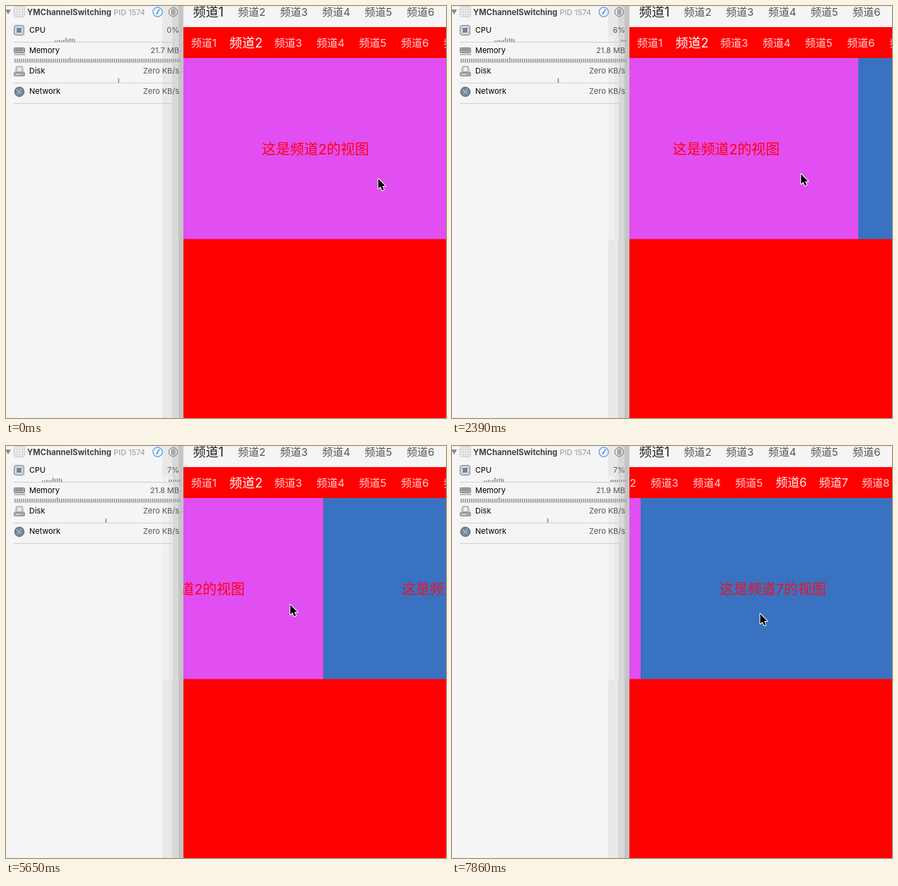
Write an HTML page with a canvas that moves like this. It is 625 px wide and 586 px high and loops after 8000 ms.

```html
<!DOCTYPE html>
<html lang="zh-CN">
<head>
<meta charset="utf-8">
<title>Channel switching</title>
<style>
  html, body { margin: 0; width: 100%; height: 100%; overflow: hidden; background: #f5f5f5; }
  canvas { display: block; }
</style>
</head>
<body>
<canvas id="stage" width="625" height="586"></canvas>
<script>
const ctx = document.getElementById('stage').getContext('2d');
const FONT = 'Inter, "Noto Sans CJK SC", "Noto Sans CJK", sans-serif';
const LOOP = 8000, STEPS = 54, LEFT = 252, PAGE = 375;

// Tracks of [step, value], interpolated linearly.
const CHANNEL = [
  [0, 2], [1, 2.01], [4, 2.55], [6, 2.95], [7, 3], [9, 3], [13, 2.3], [14, 2.021], [15, 2],
  [18, 2.4], [20, 2.85], [22, 3], [23, 3], [24, 2.979], [30, 2.464], [32, 2.112], [34, 2],
  [35, 2.02], [38, 2.47], [39, 2.75], [41, 3], [44, 3], [47, 4], [48, 4.233], [50, 5.05],
  [52, 6.2], [53, 6.957]
];
const POINTER_X = [
  [0, 528], [1, 524], [4, 322], [9, 322], [13, 520], [15, 545], [18, 395], [20, 378], [23, 378],
  [24, 386], [30, 579], [34, 579], [38, 403], [44, 403], [45, 328], [47, 546], [48, 459],
  [49, 380], [52, 500], [53, 437]
];
const POINTER_Y = [
  [0, 245], [4, 236], [9, 236], [13, 242], [20, 233], [24, 233], [30, 245], [34, 245],
  [38, 225], [48, 224], [53, 238]
];
const TAB_SCROLL = [[46, 0], [48, 7.5], [50, 20.5], [53, 99]];

function track(keys, step) {
  const next = keys.findIndex(k => k[0] > step);
  if (next < 0) return keys[keys.length - 1][1];
  if (next === 0) return keys[0][1];
  const [t0, a] = keys[next - 1], [t1, b] = keys[next];
  return a + (b - a) * (step - t0) / (t1 - t0);
}

function rect(x, y, w, h, color) {
  ctx.fillStyle = color;
  ctx.fillRect(x, y, w, h);
}

function text(str, x, y, size, color, align = 'left', weight = 400) {
  ctx.font = `${weight} ${size}px ${FONT}`;
  ctx.textAlign = align;
  ctx.fillStyle = color;
  ctx.fillText(str, x, y);
}

const centered = (str, x, middle, size, color) =>
  text(str, x, middle + size * 0.38, size, color, 'center');

function paint(fill, stroke, width = 1) {
  if (fill) { ctx.fillStyle = fill; ctx.fill(); }
  if (stroke) { ctx.strokeStyle = stroke; ctx.lineWidth = width; ctx.stroke(); }
}

function circle(x, y, r, fill, stroke, width) {
  ctx.beginPath();
  ctx.arc(x, y, r, 0, Math.PI * 2);
  paint(fill, stroke, width);
}

function line(x1, y1, x2, y2, color, width) {
  ctx.beginPath();
  ctx.moveTo(x1, y1);
  ctx.lineTo(x2, y2);
  paint(null, color, width);
}

function roundBox(x, y, w, h, r, fill, stroke) {
  ctx.beginPath();
  ctx.roundRect(x, y, w, h, r);
  paint(fill, stroke);
}

function drawShadow(step) {
  const bands = (xs, y, h) =>
    xs.forEach((x, i) => rect(x, y, LEFT - x, h, ['#e8e8e8', '#d8d8d8', '#c5c5c5'][i]));
  bands([222, 236, 245], 0, 586);
  if (step > 0) {
    rect(222, 43, 9, 289, '#f0f0f0');
    bands([231, 237, 245], 43, 289);
  }
}

function drawHeader() {
  ctx.fillStyle = '#888';
  ctx.fill(new Path2D('M-1 5H7L3 12Z'));
  ctx.setLineDash([2, 1]);
  roundBox(11.5, 0.5, 15, 15, 2, '#eee', '#bbb');
  for (let d = 4; d <= 12; d += 4) {
    line(11.5 + d, 1, 11.5 + d, 16, '#ccc');
    line(12, 0.5 + d, 27, 0.5 + d, '#ccc');
  }
  ctx.setLineDash([]);
  text('YMChannelSwitching', 30, 12.5, 11.3, '#444', 'left', 700);
  text('PID 1574', 153, 12.5, 11, '#999');
  circle(215.5, 8.5, 6.7, '#eef5fd', '#6fa8e8', 1.5);
  line(214, 11, 218, 4.5, '#5b98e0', 1.5);
  circle(214.5, 10.5, 1.3, '#5b98e0');
  circle(237.5, 8.5, 6.2, null, '#777');
  for (let x = 235.5; x < 240; x += 2) line(x, 4.5, x, 12.5, '#777');
}

function drawIcons() {
  roundBox(11.5, 27.5, 14, 14, 2.5, '#c9cccf', '#8b8b8b');
  roundBox(14.5, 30.5, 8, 8, 1, '#71859b', '#eef1f3');
  roundBox(11.5, 59.5, 15, 7, 1, '#a9afb5', '#777');
  for (let x = 12; x < 27; x += 2) rect(x, 68, 1, 2, '#777');
  rect(14, 61, 10, 3, '#8b949c');
  ctx.fillStyle = '#c8c8c8';
  ctx.fill(new Path2D('M14 85H24L26 95H12Z'));
  roundBox(11.5, 94.5, 15, 5, 1, '#aaa', '#888');
  circle(19, 90, 3.8, '#eee', '#aaa');
  rect(14, 97, 6, 1, '#eee');
  circle(19, 122, 6.8, '#778797', '#5c6670');
  line(15, 119, 22, 125, '#d5dce2');
  line(16, 125, 22, 118, '#d5dce2');
}

function drawGauges(time) {
  const ticks = Math.max(0, Math.floor((time - 260) / 985) + 1);
  const cpuTicks = ticks < 2 ? 0 : ticks;
  const diskTicks = Math.max(0, Math.floor((time - 140) / 985) + 1);
  const cpu = ticks < 2 ? 0 : ticks < 3 ? 5 : ticks < 6 ? 6 : 7;
  const memory = ticks < 2 ? '21.7' : ticks < 8 ? '21.8' : '21.9';
  const rows = [['CPU', cpu + '%'], ['Memory', memory + ' MB'], ['Disk', 'Zero KB/s'], ['Network', 'Zero KB/s']];
  rows.forEach(([name, value], i) => {
    const y = 38 + 29 * i;
    text(name, 33, y, 11, '#000');
    text(value, 246, y, 11, '#555', 'right');
    rect(11, y + 13, 227, 1, '#cfcfcf');
  });

  const bar = (x, bottom, h) => rect(x, bottom - h, 2, h, '#a6a6a6');
  [...'2232364554'].forEach((h, i) => bar(69 + 3 * (i - cpuTicks), 51, +h));
  for (let i = 0; i < cpuTicks; i++) bar(246 - 3 * i, 51, 3);
  const peak = 90 - 3 * ticks;
  for (let x = 12; x < 248; x += 3) bar(x, 80, x === peak ? 7 : 5);
  bar(159 - 3 * diskTicks, 109, 6);
}

function drawPhone(step) {
  rect(LEFT, 0, 373, 30, '#f5f5f5');
  rect(LEFT, 30, 373, 556, '#f00');
  ctx.save();
  ctx.beginPath();
  ctx.rect(LEFT, 0, 373, 586);
  ctx.clip();

  centered('频道1', 287.5, 8, 18, '#222');
  for (let i = 2; i <= 6; i++) centered('频道' + i, 229 + 60 * i, 8, 15, '#555');

  // A tab's emphasis follows the selected channel over a short trailing window.
  const SAMPLES = 20, WINDOW = 1.7;
  const emphasis = Array(10).fill(0);
  for (let k = 0; k < SAMPLES; k++) {
    const selected = Math.round(track(CHANNEL, step - WINDOW * k / SAMPLES));
    emphasis[selected] += 1 / SAMPLES;
  }
  const scroll = track(TAB_SCROLL, step);
  for (let i = 1; i <= 9; i++) {
    const e = emphasis[i], tint = 212 + 43 * e;
    centered('频道' + i, 221 + 60 * i - scroll, 52, 15 + 3 * e, `rgb(255,${tint},${tint})`);
  }

  const channel = track(CHANNEL, step);
  const first = Math.floor(channel);
  for (let i = first; i <= first + 1; i++) {
    const x = LEFT + (i - channel) * PAGE;
    rect(x, 74, PAGE, 257.5, i % 2 ? '#3872c1' : '#e14ff2');
    centered(`这是频道${i}的视图`, x + PAGE / 2, 203, 20, i % 2 ? '#f01020' : '#ff0010');
  }
  ctx.restore();
}

const ARROW = new Path2D('M0 0V14L3.2 11L5.6 16.5L8 15.5L5.7 10.2H10Z');

function drawPointer(x, y) {
  ctx.save();
  ctx.translate(x + 0.8, y + 0.8);
  ctx.strokeStyle = '#fff';
  ctx.lineWidth = 2;
  ctx.lineJoin = 'round';
  ctx.stroke(ARROW);
  ctx.fillStyle = '#000';
  ctx.fill(ARROW);
  ctx.restore();
}

function frame(now) {
  const step = Math.floor((now % LOOP) * STEPS / LOOP);
  rect(0, 0, 625, 586, '#f5f5f5');
  drawShadow(step);
  drawHeader();
  drawIcons();
  drawGauges(step * LOOP / STEPS);
  drawPhone(step);
  drawPointer(track(POINTER_X, step), track(POINTER_Y, step));
  requestAnimationFrame(frame);
}
requestAnimationFrame(frame);
</script>
</body>
</html>
```
